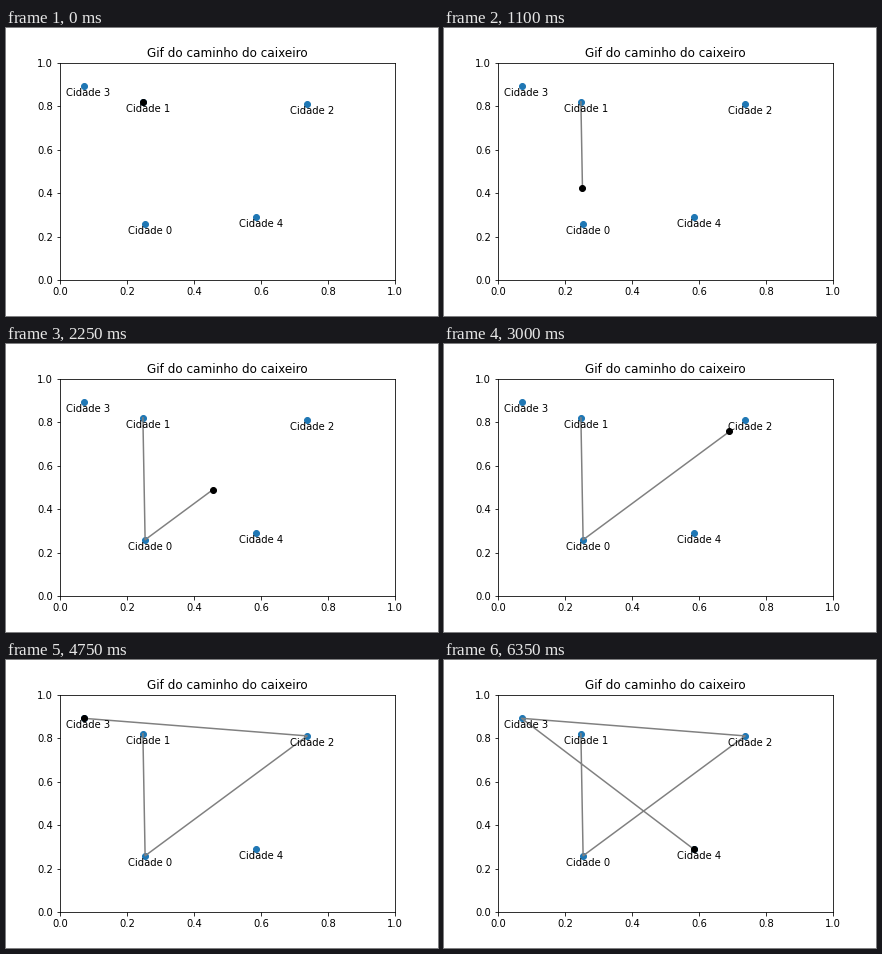
Animation of 432x288 px, one loop 6400 ms. Source, as a matplotlib script:

```python
import numpy as np
import matplotlib.pyplot as plt
from matplotlib.animation import FuncAnimation

STEPS = 32  # frames per leg, both ends included
XS = 0.2542, 0.2476, 0.7383, 0.0703, 0.5844
YS = 0.2585, 0.8195, 0.8099, 0.8908, 0.2893
CITIES = np.column_stack([XS, YS])
ROUTE = CITIES[[1, 0, 2, 3, 4]]
LEGS = len(ROUTE) - 1

plt.rcParams["font.family"] = "DejaVu Sans"
fig, ax = plt.subplots(figsize=(6, 4), dpi=72)
fig.subplots_adjust(left=0.125, right=0.9, bottom=0.125, top=0.88)
ax.set(xlim=(0, 1), ylim=(0, 1))
ax.set_title("Gif do caminho do caixeiro")

ax.scatter(XS, YS)
for i, (x, y) in enumerate(CITIES):
    ax.text(x - 0.051, y - 0.045, f"Cidade {i}")

trail, = ax.plot([], [], color="gray")
walker, = ax.plot([], [], "ko")


def update(frame):
    leg, step = divmod(frame, STEPS)
    start, end = ROUTE[leg:leg + 2]
    pos = start + (end - start) * step / (STEPS - 1)
    trail.set_data(*np.vstack([ROUTE[:leg + 1], pos]).T)
    walker.set_data(*pos[:, None])
    return trail, walker


anim = FuncAnimation(fig, update, frames=LEGS * STEPS, interval=50,
                     repeat=True, repeat_delay=0)
plt.show()
```
